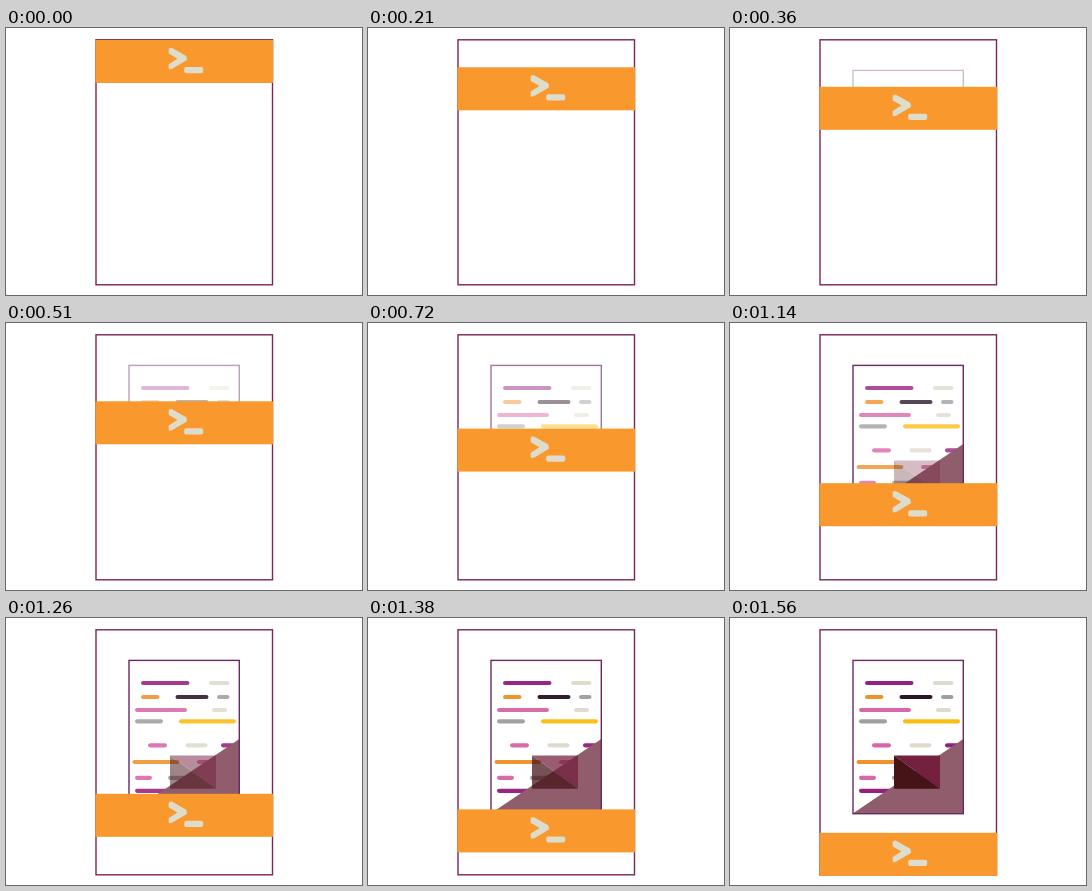
An HTML page that plays this animation: 356x267 px, repeating every 1.59 s.

```html
<!DOCTYPE html>
<html lang="en">
<head>
<meta charset="utf-8">
<title>Code page reveal</title>
<style>
html, body { margin: 0; width: 100%; height: 100%; overflow: hidden; background: #fff; }
svg { display: block; width: 100%; height: 100%; }
</style>
</head>
<body>
<svg viewBox="0 0 356 267">
  <defs>
    <clipPath id="reveal"><rect id="window" x="89" y="0" width="179" height="12"/></clipPath>
  </defs>
  <rect x="90" y="11.8" width="176.5" height="245" fill="none" stroke="#7c2456" stroke-width="1.4"/>
  <g clip-path="url(#reveal)">
    <g id="lines" fill="none" stroke-width="4.2" stroke-linecap="round"></g>
    <path id="fold" d="M233.3 121V196H122Z" fill="#8f5d6b"/>
    <g id="card">
      <path d="M164 137.5H210V170.7Z" fill="#74203f"/>
      <path d="M164 137.5V170.7H210Z" fill="#461317"/>
    </g>
    <rect id="page" x="123" y="42.4" width="110.3" height="153.3" fill="none" stroke="#6a2a61" stroke-width="1.4"/>
  </g>
  <g id="bar">
    <rect x="89.4" y="0" width="177.8" height="43" fill="#f8982d"/>
    <g fill="#dedccb" stroke="#dedccb" stroke-width="2" stroke-linejoin="round">
      <path d="M163.7 9.2L165.6 8.8L179.4 16.5L180 19.5L166.3 27.7L163.7 28.4V24.8L173.4 18.6L163.7 13Z"/>
      <rect x="179.2" y="28" width="17" height="4.2" rx="1"/>
    </g>
  </g>
</svg>
<script>
const LOOP = 1590, STEP = 30;
const purple = '#96207f', beige = '#dedbcd', orange = '#f0912a', dark = '#2c1527';
const gray = '#a0a0a0', pink = '#d967a7', yellow = '#fbbd14';

// y, then [left, right, colour] for each dash
const rows = [
  [65, [135, 183.5, purple], [203, 223.5, beige]],
  [79, [135, 153.5, orange], [169.5, 202.5, dark], [211, 223.5, gray]],
  [92, [129, 181, pink], [206, 221, beige]],
  [103.3, [129, 157, gray], [173, 230, yellow]],
  [127.3, [142, 161, pink], [179.5, 201.5, beige], [215, 231, purple]],
  [144, [126.5, 173.5, orange], [191, 215, pink]],
  [159.8, [129, 146, pink], [162, 190, gray]],
  [172.8, [129, 172, purple]]
];

const get = id => document.getElementById(id);
const bar = get('bar'), clip = get('window'), lines = get('lines');
const page = get('page'), fold = get('fold'), card = get('card');

for (const [y, ...dashes] of rows) {
  for (const [left, right, colour] of dashes) {
    const dash = document.createElementNS('http://www.w3.org/2000/svg', 'path');
    dash.setAttribute('d', `M${left + 2.1} ${y}H${right - 2.1}`);
    dash.setAttribute('stroke', colour);
    lines.append(dash);
  }
}

const ramp = (t, from, to) => Math.min(1, Math.max(0, (t - from) / (to - from)));
const fade = (el, alpha) => el.setAttribute('opacity', alpha.toFixed(3));

function draw(now) {
  const t = Math.floor((now % LOOP) / STEP) * STEP;
  const top = 12 + 0.13 * t;
  bar.setAttribute('transform', `translate(0 ${top.toFixed(2)})`);
  clip.setAttribute('height', (top + 1).toFixed(2));
  fade(lines, ramp(t, 80, 1420));
  fade(page, ramp(t, 0, 1130));
  fade(fold, ramp(t, 0, 1130));
  fade(card, ramp(t, 975, 1530));
}

let start;
function tick(now) {
  start ??= now;
  draw(now - start);
  requestAnimationFrame(tick);
}
draw(0);
requestAnimationFrame(tick);
</script>
</body>
</html>
```
